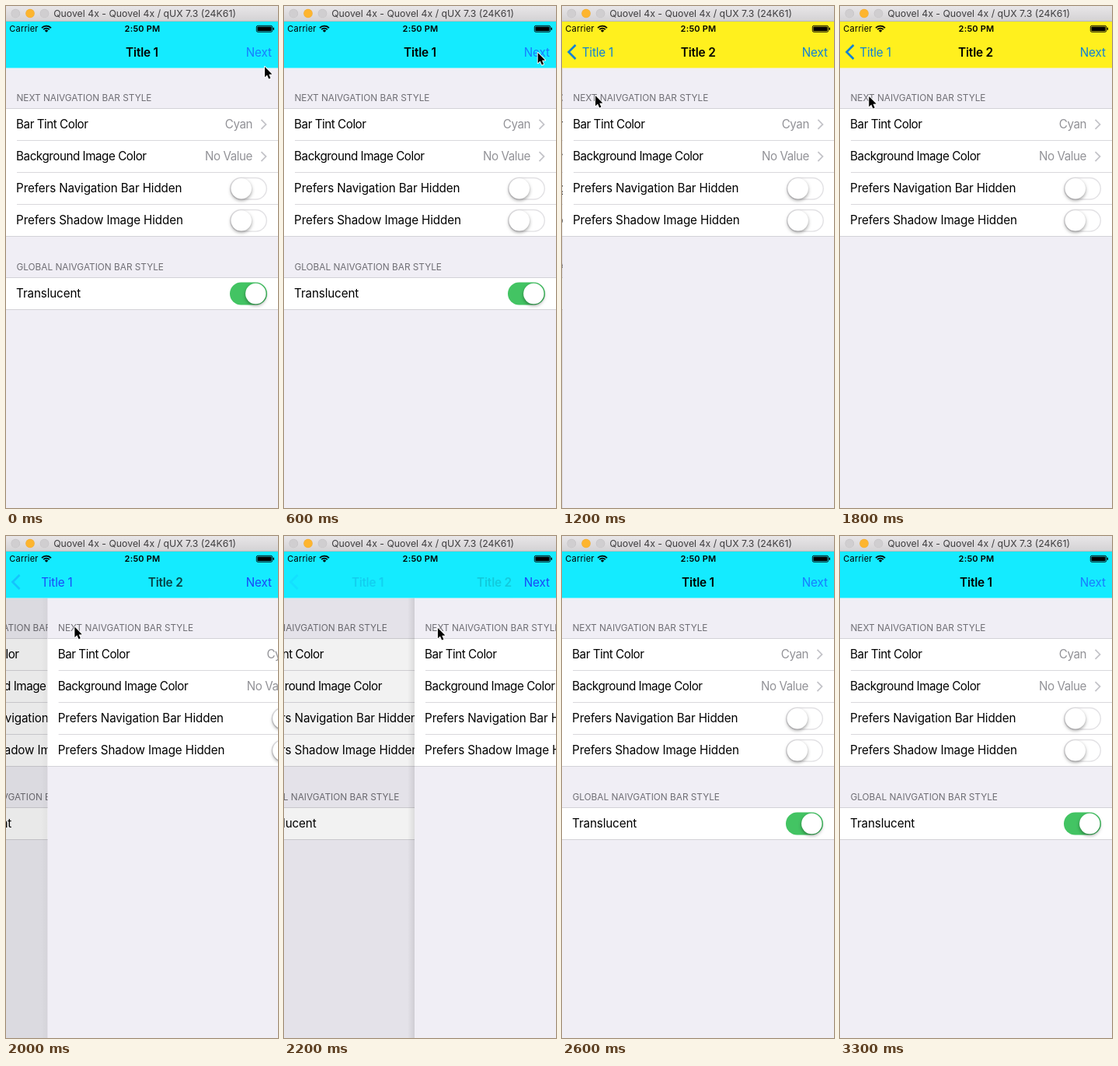
These frames come from a looping animation (350 by 644 pixels, 3400 ms). An HTML page with a canvas:

```html
<!DOCTYPE html>
<html lang="en">
<head>
<meta charset="utf-8">
<title>Navigation bar styles</title>
<style>
html, body { margin: 0; width: 100%; height: 100%; overflow: hidden; }
canvas { display: block; }
</style>
</head>
<body>
<canvas id="stage" width="350" height="644"></canvas>
<script>
const ctx = document.getElementById('stage').getContext('2d');
const W = 350, H = 644, LOOP = 3400, STEP = 100, TOP = 79.5;
const PUSH = 673, POP = 1830, POP_END = 2440;
const CYAN = '#14ebff', YELLOW = '#fff01e';

// Pointer stops: time, x, y
const POINTER = [
  [0, 333, 78], [400, 328, 60], [700, 326, 60], [900, 272, 84],
  [1000, 175, 98], [1100, 85, 110], [1200, 43, 115], [POP, 37, 116]
];

const clamp = v => Math.max(0, Math.min(1, v));

function text(str, x, y, { size = 15.2, weight = 400, color = '#000', align = 'left', track = 0, alpha = 1 } = {}) {
  if (alpha <= 0) return;
  ctx.globalAlpha = alpha;
  ctx.font = `${weight} ${size}px Inter, sans-serif`;
  ctx.letterSpacing = track + 'px';
  ctx.textAlign = align;
  ctx.fillStyle = color;
  ctx.fillText(str, x, y);
  ctx.globalAlpha = 1;
}

function rect(x, y, w, h, color) {
  ctx.fillStyle = color;
  ctx.fillRect(x, y, w, h);
}

function pill(x, y, w, h, r, color) {
  ctx.beginPath();
  ctx.roundRect(x, y, w, h, r);
  ctx.fillStyle = color;
  ctx.fill();
}

function circle(x, y, r, color) {
  ctx.beginPath();
  ctx.arc(x, y, r, 0, 7);
  ctx.fillStyle = color;
  ctx.fill();
}

function chevron(x, y, w, h, color, width) {
  ctx.beginPath();
  ctx.moveTo(x - w, y - h);
  ctx.lineTo(x, y);
  ctx.lineTo(x - w, y + h);
  ctx.strokeStyle = color;
  ctx.lineWidth = width;
  ctx.stroke();
}

function toggle(y, on) {
  pill(288, y - 14.5, 48, 29, 14.5, on ? '#43c463' : '#e2e1e4');
  if (!on) pill(289.4, y - 13.1, 45.2, 26.2, 13.1, '#fff');
  const x = on ? 321.3 : 302.8;
  ctx.save();
  ctx.shadowColor = 'rgba(0,0,0,.38)';
  ctx.shadowBlur = 4;
  ctx.shadowOffsetY = 2;
  circle(x, y, 13.2, '#fff');
  ctx.restore();
}

function section(title, y, rows) {
  text(title, 13.4, y - 9.1, { size: 11.8, color: '#6f6e74' });
  const h = 41.1, end = Math.ceil(y + rows.length * h);
  rect(0, y, W, end - y, '#fff');
  rect(0, y, W, 1, '#d3d2d7');
  rect(0, end - 1, W, 1, '#d3d2d7');
  rows.forEach(([label, value], i) => {
    const mid = y + (i + .5) * h;
    if (i) rect(14, Math.round(y + i * h), W, 1, '#d9d8dc');
    const isSwitch = typeof value === 'boolean';
    text(label, 13.1, mid + 5.6, { track: isSwitch ? -.12 : -.46 });
    if (isSwitch) {
      toggle(mid + .5, value);
    } else {
      text(value, 317, mid + 5.6, { color: '#929297', align: 'right', track: -.46 });
      chevron(334.5, mid + .4, 6, 6, '#c4c4c9', 1.8);
    }
  });
}

function page(x, first) {
  ctx.save();
  ctx.translate(x, 0);
  rect(0, TOP, W, H - TOP, '#f0eef5');
  section('NEXT NAIVGATION BAR STYLE', 131, [
    ['Bar Tint Color', 'Cyan'],
    ['Background Image Color', 'No Value'],
    ['Prefers Navigation Bar Hidden', false],
    ['Prefers Shadow Image Hidden', false]
  ]);
  if (first) section('GLOBAL NAIVGATION BAR STYLE', 348, [['Translucent', true]]);
  ctx.restore();
}

// rest: 1 = first page fully shown, 0 = second page fully shown
function pages(rest) {
  if (rest > 0) page(-105 * (1 - rest), true);
  if (rest >= 1) return;
  const x = W * rest;
  rect(0, TOP, x, H - TOP, `rgba(0,0,0,${.1 * (1 - rest)})`);
  const shade = ctx.createLinearGradient(x - 9, 0, x, 0);
  shade.addColorStop(0, 'rgba(0,0,0,0)');
  shade.addColorStop(1, `rgba(0,0,0,${.2 * rest})`);
  rect(x - 9, TOP, 9, H - TOP, shade);
  page(x, false);
}

function navBar(rest, color, tint) {
  rect(0, 19, W, TOP - 19, color);
  const y = 64.7;
  const title = { size: 15.4, weight: 600, align: 'center', track: -.2 };
  const x1 = 45.5 + 129.5 * rest;
  text('Title 1', x1, y, { ...title, alpha: clamp(1 - 1.8 * (1 - rest)) });
  text('Title 1', x1, y, { color: tint, align: 'center', track: -.15, alpha: clamp(1 - 8 * rest ** 3) });
  text('Title 2', 174.5 + 200 * rest, y, { ...title, alpha: clamp(1 - 1.8 * rest) });
  if (rest < .5) {
    ctx.globalAlpha = Math.max(.07, 1 - 5 * rest);
    chevron(8.5, 59, -9, 9, tint, 2.6);
    ctx.globalAlpha = 1;
  }
  text('Next', 341.8, y, { color: tint, align: 'right', track: -.1 });
}

function statusBar() {
  text('Carrier', 4.3, 33.3, { size: 11, track: .2 });
  text('2:50 PM', 175.5, 33.3, { size: 11, weight: 600, align: 'center', track: .2 });
  ctx.strokeStyle = '#000';
  ctx.lineWidth = 1.8;
  for (const r of [5.2, 8.2]) {
    ctx.beginPath();
    ctx.arc(52, 33.8, r, -Math.PI * .76, -Math.PI * .24);
    ctx.stroke();
  }
  ctx.beginPath();
  ctx.moveTo(52, 33.8);
  ctx.arc(52, 33.8, 3, -Math.PI * .76, -Math.PI * .24);
  ctx.fillStyle = '#000';
  ctx.fill();
  pill(323.4, 26.4, 18.2, 5.8, .8, '#000');
  ctx.beginPath();
  ctx.roundRect(322.3, 25.3, 20.4, 8, 1.8);
  ctx.lineWidth = .9;
  ctx.stroke();
  pill(343.6, 27.6, 1.4, 3.4, .7, '#000');
}

function windowBar() {
  const shade = ctx.createLinearGradient(0, 0, 0, 19);
  shade.addColorStop(0, '#e8e6e8');
  shade.addColorStop(1, '#d4d2d4');
  rect(0, 0, W, 19, shade);
  rect(0, 19, W, 1, '#b9b8ba');
  [[12.3, '#d0ced0', '#c4c2c4'], [31, '#fdb52f', '#efac38'], [49.5, '#d0ced0', '#c4c2c4']].forEach(([x, fill, edge]) => {
    circle(x, 9.5, 5.8, edge);
    circle(x, 9.5, 5.2, fill);
  });
  text('Quovel 4x - Quovel 4x / qUX 7.3 (24K61)', 178.5, 14.1, { size: 12.3, color: '#3e3d3f', align: 'center' });
}

function pointer(x, y) {
  ctx.save();
  ctx.translate(x, y);
  ctx.beginPath();
  ctx.moveTo(0, 0);
  for (const [px, py] of [[0, 13.3], [3, 10.6], [5.2, 15.6], [7.4, 14.6], [5.3, 9.8], [9.4, 9.6]]) ctx.lineTo(px, py);
  ctx.closePath();
  ctx.lineJoin = 'round';
  ctx.lineWidth = 1.8;
  ctx.strokeStyle = '#fff';
  ctx.stroke();
  ctx.fillStyle = '#000';
  ctx.fill();
  ctx.restore();
}

// Critically damped spring, 1 falling to 0
function spring(ms) {
  const k = Math.max(0, ms) * .0155;
  return (1 + k) * Math.exp(-k);
}

function pointerAt(t, drag) {
  if (t >= POP) return [37 + drag * W * .958, 116 + drag * 4];
  const i = POINTER.findIndex(p => p[0] > t);
  const [a, b] = [POINTER[i - 1], POINTER[i]];
  const u = (t - a[0]) / (b[0] - a[0]);
  return [a[1] + (b[1] - a[1]) * u, a[2] + (b[2] - a[2]) * u];
}

function draw(t) {
  const drag = clamp((t - POP) / (POP_END - POP)) ** 1.468;
  const popping = t > POP;
  const second = t > PUSH && !popping;
  const moving = popping && drag < 1;
  ctx.clearRect(0, 0, W, H);
  pages(popping ? drag : spring(t - PUSH));
  navBar(popping ? drag : spring(t - PUSH - 12),
    second ? YELLOW : CYAN,
    second ? '#0f80d8' : moving ? '#1a46f8' : '#177cff');
  statusBar();
  windowBar();
  if (t < POP_END) pointer(...pointerAt(t, drag));
}

let start;
function frame() {
  const now = performance.now();
  start ??= now;
  draw(Math.floor((now - start) % LOOP / STEP) * STEP);
  requestAnimationFrame(frame);
}
frame();
</script>
</body>
</html>
```
